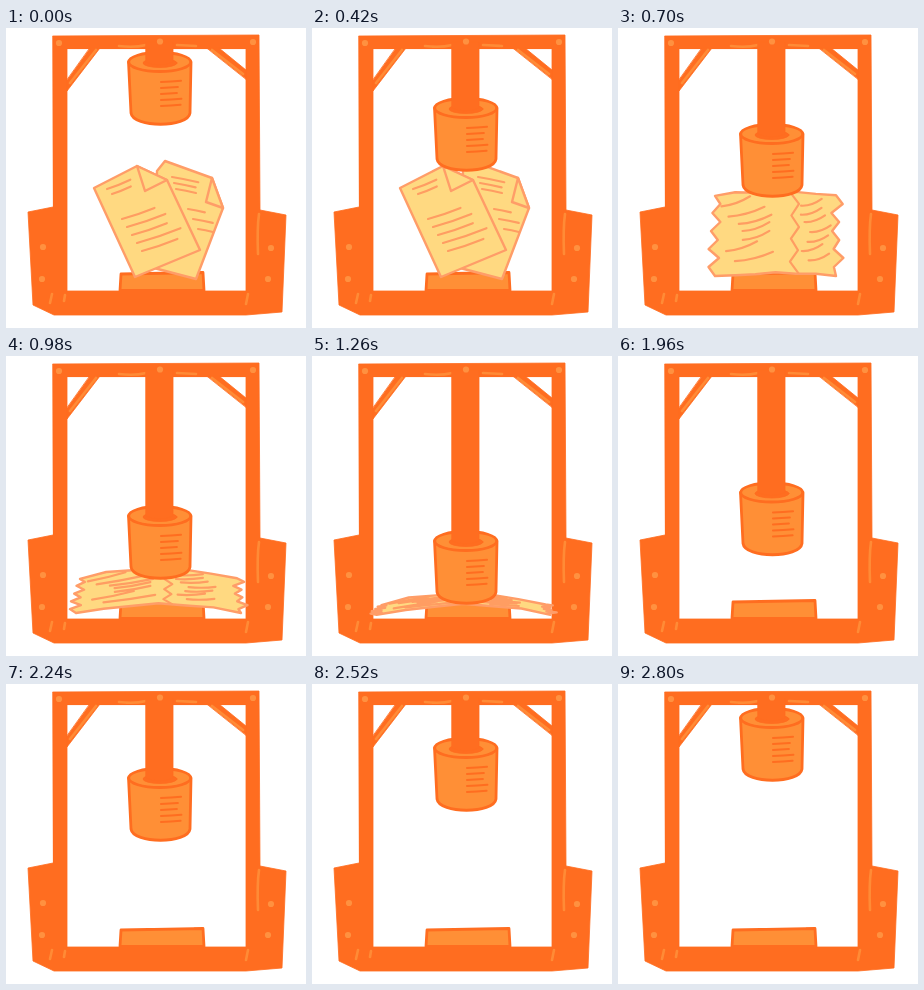
Write an HTML page that moves like this. It is 300 px wide and 300 px high and loops after 3.5 s.

```html
<!DOCTYPE html>
<html lang="en">
<head>
<meta charset="utf-8">
<title>Paper press</title>
<style>
html, body { margin: 0; width: 100%; height: 100%; overflow: hidden; background: #fff; }
svg { display: block; width: 100vw; height: 100vh; }
path, ellipse { stroke-linecap: round; stroke-linejoin: round; }
.main { fill: #ff6d20; stroke: #ff6d20; stroke-width: 0.8; }
.body { fill: #ff8f36; stroke: #ff6d20; stroke-width: 2.8; }
.shine { fill: none; stroke: #ff8b36; stroke-width: 2.6; }
.dot { fill: #ff9140; }
.mark { fill: none; stroke: #ff6d20; stroke-width: 2.1; }
.paper { fill: #ffd981; stroke: #ff9d68; stroke-width: 2.4; }
.line { fill: none; stroke: #ff9d62; stroke-width: 2.2; }
</style>
</head>
<body>
<svg viewBox="0 0 300 300">
  <path class="main" fill-rule="evenodd" d="M47 8L253 7L254 182L280 187L276 284L240 287L48 287L27 277L22 184L47 179ZM61 21V263H240V21Z"/>
  <path class="main" d="M84 20L94 20L61 63V52ZM201 20H213L240 42V51Z"/>
  <path class="shine" d="M90 22L64 55M206 22L237 46M113 18Q128 20 140 17M171 17L190 18M46 266L44 275M59 267L58 273M242 266L240 276M253 186Q251 200 252 226"/>
  <path class="body" d="M115 246L197 244.500L198 262.500H114Z"/>
  <g id="sheets">
    <path class="paper" d="M151 143L159 133L206 150L217 180L190 251L148 240Z"/>
    <path class="paper" d="M206 150L200 174L217 180Z"/>
    <path id="backText" class="line"/>
    <path class="paper" d="M88 160L131 138L161 152L194 222L129 249Z"/>
    <path class="paper" d="M131 138L139 163L161 152Z"/>
    <path id="frontText" class="line"/>
  </g>
  <g id="wad">
    <path id="crumple" class="paper"/>
    <path id="creases" class="line"/>
  </g>
  <g id="head">
    <path class="body" d="M122.500 -62L125 -11C127 4 182 4 184 -11L185 -62Z"/>
    <ellipse class="body" cx="153.700" cy="-62" rx="31" ry="9.500"/>
    <ellipse class="main" cx="154" cy="-61" rx="17" ry="4.500"/>
    <path id="marks" class="mark"/>
  </g>
  <path id="shaft" class="main"/>
  <g id="rivets"></g>
</svg>
<script>
const el = id => document.getElementById(id);
const put = (id, d) => el(id).setAttribute("d", d);
const mix = (a, b, k) => a + (b - a) * k;
const LOOP = 3500, STEP = 140;

// Lower edge of the press head: [step, y]
const keys = [[0, 96], [3, 142], [5, 168], [7, 222], [9, 247], [11, 247], [12, 241], [16, 156], [20, 96]];

function headY(step) {
  const i = keys.findIndex(([s]) => s > step);
  if (i < 0) return 96;
  const [s0, y0] = keys[i - 1], [s1, y1] = keys[i];
  return mix(y0, y1, (step - s0) / (s1 - s0));
}

// Repeatable noise between -1 and 1
const noise = n => {
  const v = Math.sin(n * 127.1 + 3.7) * 43758.5;
  return (v - Math.floor(v)) * 2 - 1;
};

// Slanted rows of writing; each row moves on by (dx, dy)
function rows(count, x, y, dx, dy, length, slope) {
  let d = "";
  for (let i = 0; i < count; i++) {
    const w = length * (1 + 0.2 * noise(i + x));
    d += `M${x + i * dx} ${y + i * dy}q${w * 0.5} ${w * slope * 0.4} ${w} ${w * slope}`;
  }
  return d;
}

// The pile spreads, droops and flattens as the head comes down
function crush(y) {
  const k = Math.max(0, Math.min(1.2, (y - 168) / 54));
  const left = mix(97, 74, k), right = mix(218, 231, k);
  const top = y - mix(4, 9, Math.min(k, 1)), bottom = mix(245, 248, k);
  const droop = mix(3, 9, k);
  const at = (u, v, dx = 0, dy = 0) => {
    const x = mix(left, right, u) + dx + (u - 0.5) * 8 * v * k;
    const h = mix(top, bottom, v) + dy + droop * (2 * u - 1) ** 2;
    return `${x.toFixed(1)} ${h.toFixed(1)}`;
  };
  const edge = [], teeth = 9;
  const side = (u, v, i) => at(u, v, (i % 2 ? 5 : -4) + 2.5 * noise(i + u * 40));
  for (let i = 0; i <= 6; i++) edge.push(at(i / 6, 0, 0, noise(i + 20)));
  for (let i = 1; i < teeth; i++) edge.push(side(1, i / teeth, i));
  for (let i = 6; i >= 0; i--) edge.push(at(i / 6, 1, 0, noise(i + 30)));
  for (let i = teeth - 1; i > 0; i--) edge.push(side(0, i / teeth, i));
  put("crumple", "M" + edge.join("L") + "Z");

  const seam = mix(0.66, 0.56, k), folds = [];
  for (let i = 0; i <= 7; i++) folds.push(at(seam, i / 7, (i % 2 ? 4 : -4) + noise(i)));
  let d = "M" + folds.join("L");
  for (let i = 0; i < 14; i++) {
    const v = 0.16 + 0.11 * (i >> 1) + 0.02 * noise(i);
    const u = i % 2 ? seam + 0.09 + 0.04 * noise(i + 5) : 0.16 + 0.12 * noise(i + 5);
    const w = i % 2 ? 0.17 : 0.27 + 0.05 * noise(i);
    d += `M${at(u, v)}Q${at(u + w / 2, v)} ${at(u + w, v - 0.1)}`;
  }
  put("creases", d);
}

function draw(time) {
  const step = Math.floor((time % LOOP) / STEP), y = headY(step);
  el("head").setAttribute("transform", `translate(0 ${y})`);
  put("shaft", `M140 14H167V${y - 62}Q153 ${y - 56} 140 ${y - 62}Z`);
  el("sheets").style.display = step < 4 ? "" : "none";
  el("wad").style.display = step >= 4 && step < 12 ? "" : "none";
  crush(y);
}

const dots = (...list) => list.map(([x, y]) => `<circle class="dot" cx="${x}" cy="${y}" r="3.1"/>`).join("");
el("rivets").innerHTML = dots([53, 15], [154, 13.5], [247, 14], [37, 219], [36, 251], [265, 220], [262, 251]);
put("marks", rows(5, 155, -42, 0, 6, 19, -0.06));
put("frontText", rows(2, 101, 161, 5, 5, 23, -0.4) + rows(5, 116, 191, 5, 8, 40, -0.34));
put("backText", rows(3, 166, 149, 2, 6, 22, 0.2) + rows(3, 182, 181, 5, 10, 18, 0.2));

const start = performance.now();
function tick() {
  draw(performance.now() - start);
  requestAnimationFrame(tick);
}
draw(0);
requestAnimationFrame(tick);
</script>
</body>
</html>
```
